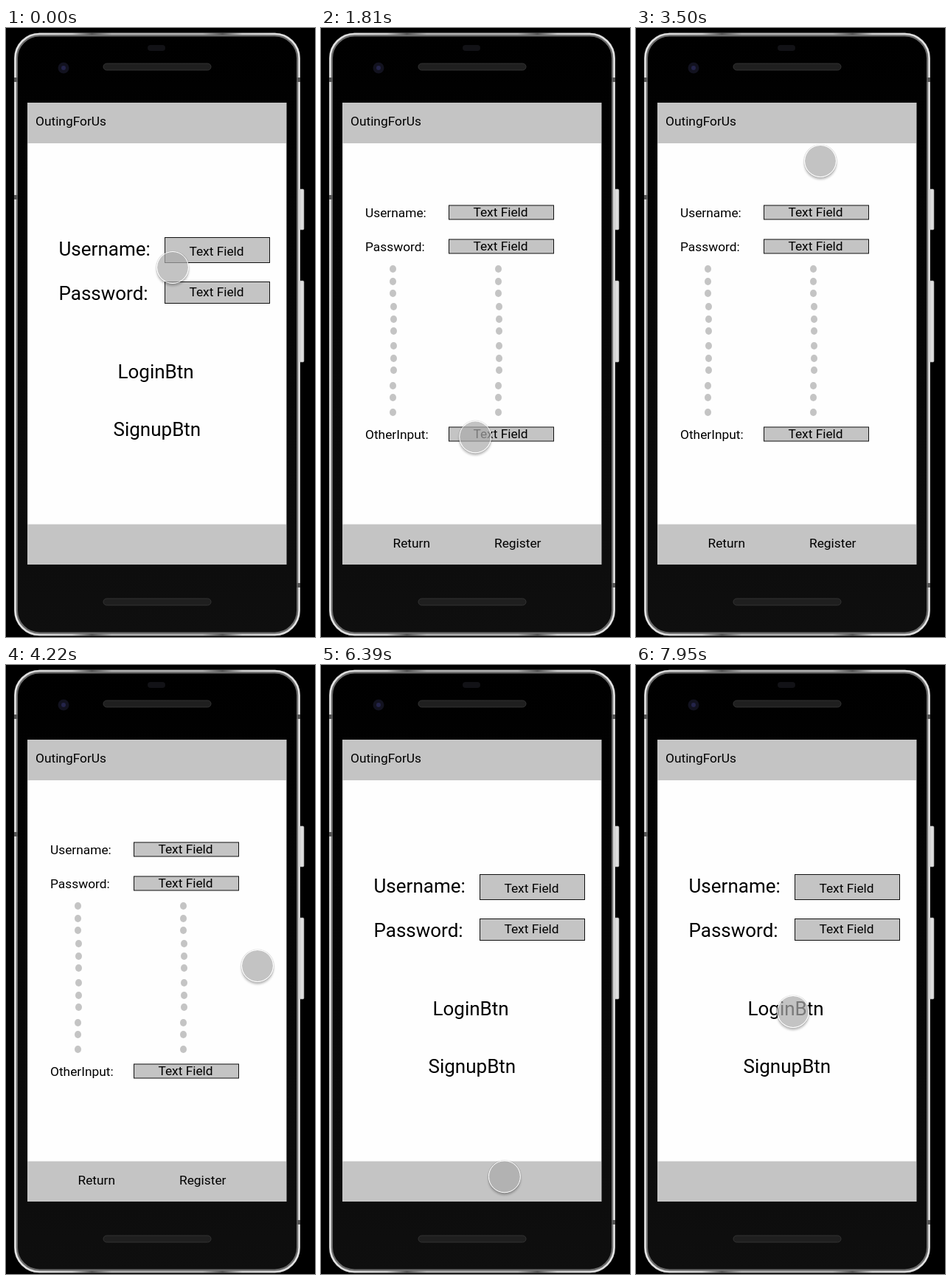
These frames come from a looping animation (419x824 px, 8000 ms). An HTML page:

```html
<!DOCTYPE html>
<html lang="en">
<head>
<meta charset="utf-8">
<title>Phone prototype</title>
<style>
  html, body { margin: 0; width: 100%; height: 100%; overflow: hidden; background: #000; }
  svg { position: absolute; left: 0; top: 0; }
  text { font: 17.33px Roboto, sans-serif; }
  .big text { font-size: 26px; }
  .big text.label, .label { font-size: 17.33px; text-anchor: middle; }
  .field { fill: #c4c4c4; stroke: #111; }
  #touch {
    position: absolute; left: -22px; top: -22px; width: 44px; height: 44px;
    box-sizing: border-box; border: 1px solid #fff; border-radius: 50%;
    background: rgba(171, 171, 171, .7) padding-box;
    box-shadow: 0 0 1px rgba(0, 0, 0, .55), 0 3px 3px rgba(0, 0, 0, .25);
  }
</style>
</head>
<body>
<svg width="419" height="824" viewBox="0 0 419 824">
  <defs>
    <linearGradient id="body" x2="0" y2="1">
      <stop stop-color="#000"/><stop offset=".5" stop-color="#060606"/><stop offset="1" stop-color="#0f0f0f"/>
    </linearGradient>
    <linearGradient id="metal">
      <stop stop-color="#e4e4e4"/><stop offset=".2" stop-color="#ccc"/><stop offset=".27" stop-color="#555"/>
      <stop offset=".34" stop-color="#b0b0b0"/><stop offset=".66" stop-color="#b0b0b0"/>
      <stop offset=".73" stop-color="#555"/><stop offset=".8" stop-color="#ccc"/><stop offset="1" stop-color="#e4e4e4"/>
    </linearGradient>
  </defs>

  <g fill="#dcdcdc" stroke="#999" stroke-width=".6">
    <rect x="398" y="218" width="6" height="55" rx="1.5"/>
    <rect x="398" y="342" width="6" height="110" rx="1.5"/>
  </g>
  <rect x="13.5" y="9" width="383" height="811" rx="32" fill="url(#body)" stroke="#6c6c6c" stroke-width="5"/>
  <rect x="12.5" y="8" width="385" height="813" rx="33" fill="none" stroke="url(#metal)" stroke-width="2.5"/>
  <path d="M11 70h5M11 229h5M394 70h5M394 754h5" stroke="#555" stroke-width="6"/>
  <rect x="192" y="23" width="24" height="8" rx="4" fill="#121216"/>
  <circle cx="78" cy="54" r="7.5" fill="#12121f"/>
  <circle cx="78" cy="54" r="3" fill="#24244a"/>
  <g fill="#1f1f1f" stroke="#333">
    <rect x="132" y="48" width="146" height="9" rx="4.5"/>
    <rect x="132" y="772" width="146" height="9" rx="4.5"/>
  </g>

  <path d="M29 101h351.500v625H29z" fill="#c4c4c4"/>
  <path d="M29.500 156H380v515.500H29.500z" fill="#fefefe"/>
  <text x="40" y="132">OutingForUs</text>

  <g id="login" class="big">
    <text x="71.500" y="307.500">Username:</text>
    <text x="71.500" y="367.500">Password:</text>
    <text x="151.500" y="474">LoginBtn</text>
    <text x="145.500" y="552">SignupBtn</text>
  </g>
  <g id="signup">
    <text x="60" y="255.500">Username:</text>
    <text x="60" y="301.500">Password:</text>
    <text x="60" y="555.500">OtherInput:</text>
    <text x="97.500" y="702.500">Return</text>
    <text x="235" y="703">Register</text>
  </g>
</svg>
<div id="touch"></div>

<script>
const LOOP = 8000, STEP = 120.4, SIGNUP_OPEN = 15, SIGNUP_CLOSE = 50;
const login = document.getElementById('login');
const signup = document.getElementById('signup');
const touch = document.getElementById('touch');

function add(parent, tag, attrs, content = '') {
  const el = document.createElementNS('http://www.w3.org/2000/svg', tag);
  for (const name in attrs) el.setAttribute(name, attrs[name]);
  el.textContent = content;
  parent.append(el);
}

function addField(parent, x, y, height, baseline) {
  add(parent, 'rect', { class: 'field', x: x + .5, y: y + .5, width: 142, height });
  add(parent, 'text', { class: 'label', x: x + 70.5, y: baseline }, 'Text Field');
}

addField(login, 215, 283, 34, 307.5);
addField(login, 215, 343, 29, 363);
for (const y of [240, 286, 540]) addField(signup, 173, y - .5, 19, y + 15.3);

[326, 343, 359, 377, 394, 410, 430, 447, 463, 484, 500, 520].forEach((cy, i) => {
  const shift = i > 2 && i < 9 ? 1 : 0;
  for (const x of [97.5, 240.5])
    add(signup, 'ellipse', { cx: x + shift, cy, rx: 4.5, ry: 5, fill: '#c4c4c4' });
});

// Touch path: [step, x, y]
const path = [
  [0, 226, 324], [2, 215, 295], [3, 236, 288], [5, 322, 376], [7, 277, 527], [9, 234, 549],
  [12, 210, 553], [14, 209, 553], [17, 209, 553], [18, 204, 548], [20, 146, 486], [22, 56, 370],
  [23, 38, 306], [24, 39, 248], [25, 54, 203], [27, 140, 161], [29, 250, 180], [31, 345, 254],
  [33, 360, 330], [35, 341, 407], [38, 294, 537], [41, 246, 620], [45, 218, 681], [46, 217, 692],
  [47, 225, 695], [49, 256, 695], [50, 257, 695], [52, 257, 695], [54, 232, 684], [56, 162, 640],
  [58, 105, 575], [59, 97, 526], [61, 116, 476], [63, 162, 461], [66, 213, 469]
];

function slope(i, axis) {
  const a = path[Math.max(i - 1, 0)], b = path[Math.min(i + 1, path.length - 1)];
  return (b[axis] - a[axis]) / (b[0] - a[0]);
}

// Cubic Hermite interpolation between path points
function position(step, axis) {
  const next = path.findIndex(p => p[0] >= step);
  if (path[next][0] === step) return path[next][axis];
  const i = next - 1, a = path[i], b = path[next];
  const span = b[0] - a[0], u = (step - a[0]) / span, v = 1 - u;
  return v * v * ((1 + 2 * u) * a[axis] + u * span * slope(i, axis))
       + u * u * ((1 + 2 * v) * b[axis] - v * span * slope(next, axis));
}

function draw(now) {
  const step = Math.min(66, Math.floor((now % LOOP + 4) / STEP));
  const onSignup = step >= SIGNUP_OPEN && step < SIGNUP_CLOSE;
  login.style.display = onSignup ? 'none' : '';
  signup.style.display = onSignup ? '' : 'none';
  touch.style.transform = `translate(${position(step, 1)}px, ${position(step, 2)}px)`;
}

const start = performance.now();
function tick() {
  draw(performance.now() - start);
  requestAnimationFrame(tick);
}
tick();
</script>
</body>
</html>
```
